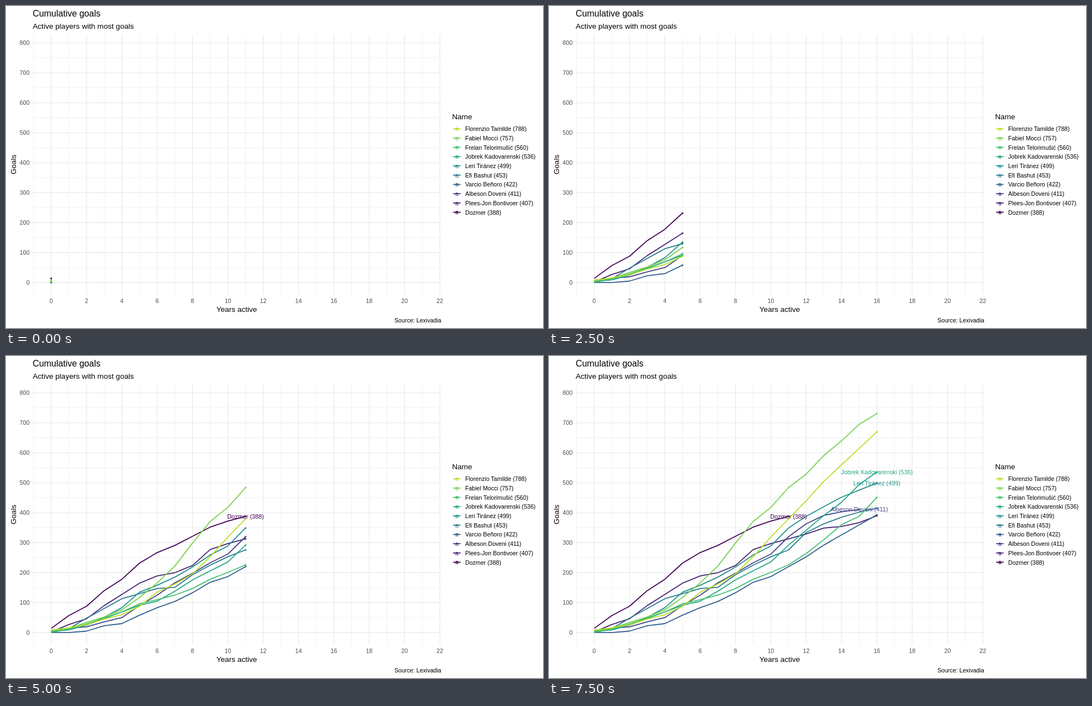
Recreate the animation shown at these times as an HTML page. Size 966 px wide and 580 px high, loop 8000 ms.

```html
<!DOCTYPE html>
<html lang="en">
<head>
<meta charset="utf-8">
<title>Cumulative goals</title>
<style>
html, body { margin: 0; width: 100%; height: 100%; overflow: hidden; background: #fff; }
svg { display: block; font-family: "Liberation Sans", Arial, sans-serif; font-size: 10.6px; }
.axis { fill: #4d4d4d; }
.name { font-size: 13.5px; }
.label { font-size: 10.8px; text-anchor: middle; }
polyline { fill: none; stroke-width: 1.8; stroke-linejoin: round; }
</style>
</head>
<body>
<svg id="stage" width="966" height="580" viewBox="0 0 966 580"></svg>
<script>
// Goals by year; empty slots lie on a straight line between their neighbours.
const players = [
  ['Florenzio Tamilde', 788, '#bbdf27', [8, 16, 26, 45, 60, 88, 135, 162, 196, 253, 319, , 440, 505, , , 670]],
  ['Fabiel Mocci', 757, '#7ad151', [6, 14, 34, 52, 76, 117, 166, 222, 299, 371, 418, 484, 529, 591, 640, 695, 731]],
  ['Frelan Telorimušić', 560, '#43bf71', [1, 13, 29, , 69, 96, 110, 125, 147, 178, 201, 226, 264, 310, 360, 388, 451]],
  ['Jobrek Kadovarenski', 536, '#22a884', [4, 9, 25, , , 91, 105, 138, 176, , 236, 292, , 391, 435, 494, 536]],
  ['Leri Tiránez', 499, '#21908c', [0, , 25, 51, 83, 135, 158, 185, 219, 259, 289, 349, 388, , 452, , 499]],
  ['Efi Bashut', 453, '#2a788e', [2, 13, 48, , 113, , 147, 151, 193, 225, 253, 276, 334, 363, 385, 402, 415]],
  ['Varcio Beñoro', 422, '#35608d', [0, 0, 5, 23, 30, 58, 83, 104, 133, 168, 187, , 253, 292, 326, , 393]],
  ['Albeson Doveni', 411, '#414487', [8, 15, 19, 36, 50, 90, 125, 166, 198, 233, 262, 320, 363, 391, 403, 411]],
  ['Plees-Jon Bontivoer', 407, '#482475', [2, 27, 46, 90, , 165, 189, 200, 224, 277, 297, , 329, 349, 354, 367, 390]],
  ['Dozmer', 388, '#440154', [14, 57, 88, 140, 178, 232, 267, 291, , 352, 372, 388]]
].map(([name, total, color, goals]) => ({ text: `${name} (${total})`, total, color, goals: fill(goals) }));

function fill(goals) {
  for (let i = 1; i < goals.length; i++) {
    if (i in goals) continue;
    let next = i;
    while (!(next in goals)) next++;
    goals[i] = goals[i - 1] + (goals[next] - goals[i - 1]) / (next - i + 1);
  }
  return goals;
}

const px = year => 81.3 + 31.78 * year;
const py = goals => 498.2 - 0.5397 * goals;
const text = (x, y, str, attrs = '') => `<text x="${x}" y="${y}" ${attrs}>${str}</text>`;
const line = (x1, y1, x2, y2, color, width) =>
  `<path d="M${x1} ${y1}L${x2} ${y2}" stroke="${color}" stroke-width="${width}"/>`;
const dot = (x, y, color) => `<circle cx="${x}" cy="${y}" r="1.6" fill="${color}"/>`;

function grid() {
  const minor = [], major = [], labels = [];
  for (let year = -1; year <= 22; year++) {
    const even = year % 2 === 0, x = px(year);
    (even ? major : minor).push(line(x, 51.5, x, 519.5, '#ebebeb', even ? 1.35 : 0.7));
    if (even) labels.push(text(x, 535, year, 'class="axis" text-anchor="middle"'));
  }
  for (let goals = 0; goals <= 800; goals += 50) {
    const whole = goals % 100 === 0, y = py(goals);
    (whole ? major : minor).push(line(48, y, 782.3, y, '#ebebeb', whole ? 1.35 : 0.7));
    if (whole) labels.push(text(42.3, y + 4, goals, 'class="axis" text-anchor="end"'));
  }
  return [...minor, ...major, ...labels].join('');
}

function legend() {
  return text(802.5, 204, 'Name', 'class="name"') + players.map((p, i) => {
    const y = 221.2 + 16.7 * i;
    return line(804.2, y, 817.8, y, p.color, 1.8) + dot(811, y, p.color) +
      text(811, y + 3.8, 'a', `class="label" fill="${p.color}"`) +
      text(826, y + 4, p.text);
  }).join('');
}

const stage = document.getElementById('stage');
stage.innerHTML = grid() + legend() +
  text(48, 19, 'Cumulative goals', 'font-size="15.9"') +
  text(48, 41, 'Active players with most goals', 'font-size="13.6"') +
  text(415, 551, 'Years active', 'class="name" text-anchor="middle"') +
  text(0, 0, 'Goals', 'class="name" text-anchor="middle" transform="translate(18 285.5) rotate(-90)"') +
  text(783, 570, 'Source: Lexivadia', 'text-anchor="end"') +
  '<g id="chart"></g>';
const chart = document.getElementById('chart');
const stack = [...players].reverse();

function draw(year) {
  let lines = '', dots = '', labels = '';
  for (const { text: label, total, color, goals } of stack) {
    const last = Math.min(year, goals.length - 1);
    const x = px(last), y = py(goals[last]);
    const points = goals.slice(0, last + 1).map((g, i) => `${px(i)},${py(g)}`);
    lines += `<polyline points="${points.join(' ')}" stroke="${color}"/>`;
    dots += dot(x, y, color);
    if (goals[last] === total) labels += text(x, y + 4, label, `class="label" fill="${color}"`);
  }
  chart.innerHTML = lines + dots + labels;
}

let shown = -1;
function tick() {
  const step = Math.floor(performance.now() / 500) % 16;
  const year = step < 10 ? step : step + 1; // the tenth step covers two years
  if (year !== shown) draw(shown = year);
  requestAnimationFrame(tick);
}
tick();
</script>
</body>
</html>
```
